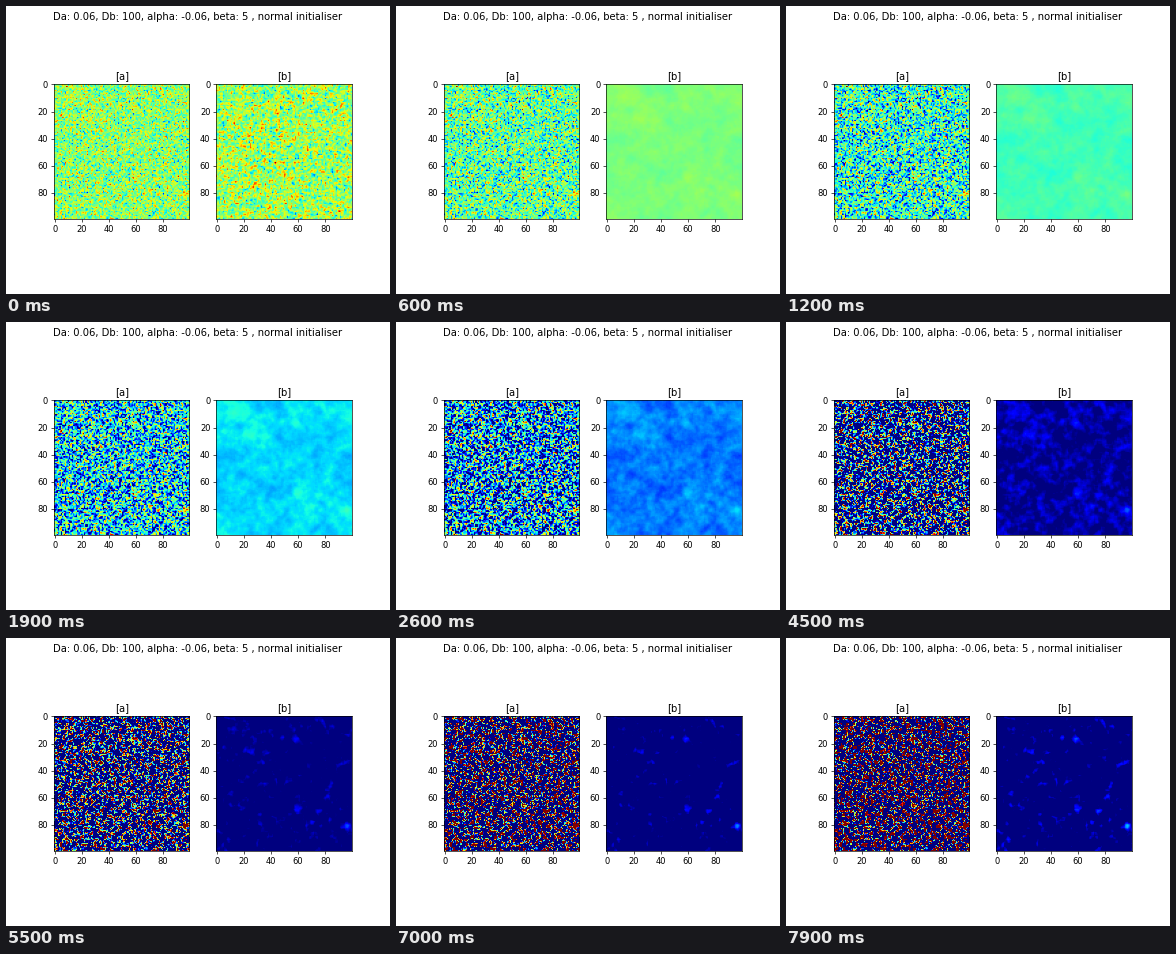
A matplotlib script for the animation above (8 s loop, 384 by 288 pixels).

```python
import numpy as np
import matplotlib.pyplot as plt
from matplotlib.animation import FuncAnimation

Da, Db, alpha, beta = 0.06, 100, -0.06, 5
SIZE, DT, STEPS, FRAMES = 100, 0.001, 50, 80
NOISE = 0.05


def laplacian(u):
    return (np.roll(u, 1, 0) + np.roll(u, -1, 0)
            + np.roll(u, 1, 1) + np.roll(u, -1, 1) - 4 * u)


def normal_initialiser():
    rng = np.random.RandomState(42)
    return rng.normal(0, NOISE, (2, SIZE, SIZE))


def advance(a, b):
    da = Da * laplacian(a) + a - a ** 3 - b + alpha
    db = Db * laplacian(b) + beta * (a - b)
    return a + DT * da, b + DT * db


def simulate():
    a, b = advance(*normal_initialiser())
    states = [(a, b)]
    for _ in range(FRAMES - 1):
        for _ in range(STEPS):
            a, b = advance(a, b)
        states.append((a, b))
    return states


states = simulate()

fig, axes = plt.subplots(1, 2, figsize=(6.4, 4.8), dpi=60)
fig.suptitle(f"Da: {Da}, Db: {Db}, alpha: {alpha}, beta: {beta} , normal initialiser")

# The colour range stays that of the starting noise
limits = [(-0.2, 0.185), (-0.145, 0.125)]
images = []
for ax, name, field, (lo, hi) in zip(axes, "ab", states[0], limits):
    images.append(ax.imshow(field, cmap="jet", vmin=lo, vmax=hi,
                            interpolation="antialiased"))
    ax.set_title(f"[{name}]")
    ax.set_xticks(range(0, SIZE, 20))
    ax.set_yticks(range(0, SIZE, 20))


def draw(i):
    for image, field in zip(images, states[i]):
        image.set_data(field)
    return images


anim = FuncAnimation(fig, draw, frames=FRAMES, interval=100,
                     repeat=True, repeat_delay=0, blit=False)
plt.show()
```
